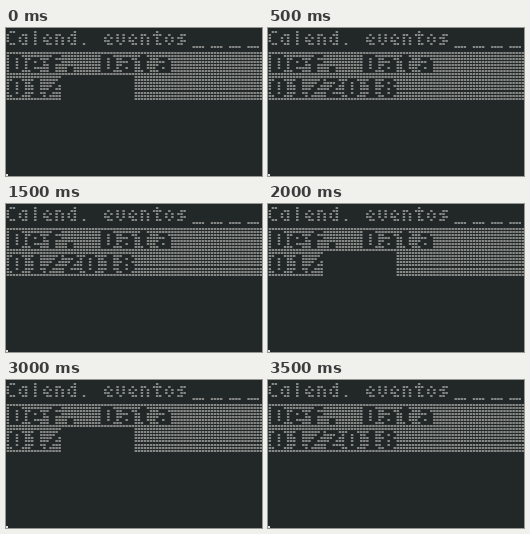
Recreate the animation shown at these times as an HTML page with a canvas. Size 256 by 148 pixels, loop 4 s.

```html
<!DOCTYPE html>
<html lang="pt">
<head>
<meta charset="utf-8">
<style>
html, body { margin: 0; width: 100%; height: 100%; overflow: hidden; background: #222727; }
canvas { display: block; }
</style>
</head>
<body>
<canvas width="256" height="148" aria-label="Calend. eventos: Def. Data 01/2018"></canvas>
<script>
const ctx = document.querySelector('canvas').getContext('2d');
const BACK = '#222727', LIT = '#868886';
const PITCH = 256 / 84, GAP = PITCH / 5;
const CELL = 6, ROW = 8, COLS = 14;

// Glyph rows run top to bottom; # is an inked dot.
const small = {
  C: '.## #.. #.. #.. .##', a: '... .## #.# #.# .##',
  l: '.#. .#. .#. .#. .#.', e: '... .#. #.# ##. .##',
  n: '... ##. #.# #.# #.#', d: '..# .## #.# #.# .##',
  '.': '... ... ... ... .#.', v: '... #.# #.# #.# .#.',
  t: '.#. ### .#. .#. .##', o: '... .#. #.# #.# .#.',
  s: '... .## ##. .## ##.'
};
const large = {
  D: '####. ##.## ##.## ##.## ##.## ####.',
  e: '..... .###. ##.## ##### ##... .###.',
  f: '..### .##.. ##### .##.. .##.. .##..',
  a: '..... .###. ...## .#### ##.## .####',
  t: '.##.. ####. .##.. .##.. .##.. ..##.',
  '.': '..... ..... ..... ..... .##.. .##..',
  0: '.###. ##.## ##.## ##.## ##.## .###.',
  1: '..##. .###. ..##. ..##. ..##. .####',
  2: '####. ...## ..##. .##.. ##... #####',
  8: '.###. ##.## .###. ##.## ##.## .###.',
  '/': '....# ...## ..##. .##.. ##... #....',
  _: '..... ..... ..... ..... ..... ####.'
};

// Each dot keeps a narrow gap on its left and a dark line below.
function dot(x, y) {
  ctx.fillStyle = LIT;
  ctx.fillRect(x * PITCH + GAP, Math.floor(y * PITCH), PITCH - GAP, 2);
}

function eachDot(text, font, advance, draw) {
  [...text].forEach((char, i) => {
    (font[char] || '').split(' ').forEach((line, y) => {
      [...line].forEach((ink, x) => {
        if (ink === '#') draw(i * advance + x, y);
      });
    });
  });
}

function inverseLine(text, row, hiddenFrom = COLS, hiddenTo = COLS) {
  const dark = new Set();
  eachDot(text, large, CELL, (x, y) => dark.add(`${x + 1},${y + 1}`));
  for (let y = 0; y < ROW; y++) {
    for (let x = 0; x < COLS * CELL; x++) {
      const col = Math.floor(x / CELL);
      const hidden = col >= hiddenFrom && col < hiddenTo;
      if (!hidden && !dark.has(`${x},${y}`)) dot(x, row * ROW + y);
    }
  }
}

function draw(time) {
  const yearShown = Math.floor(time / 500) % 2 === 1;
  ctx.fillStyle = BACK;
  ctx.fillRect(0, 0, 256, 148);
  eachDot('Calend. eventos', small, 4, (x, y) => dot(x, y + 1));
  eachDot('____', large, CELL, (x, y) => dot(x + 10 * CELL + 1, y + 1));
  inverseLine('Def. Data', 1);
  if (yearShown) inverseLine('01/2018', 2);
  else inverseLine('01/2018', 2, 3, 7);
  ctx.fillStyle = '#e0e2e0';
  ctx.fillRect(0, 146, 2, 2);
}

const start = performance.now();
function frame() {
  draw((performance.now() - start) % 4000);
  requestAnimationFrame(frame);
}
frame();
</script>
</body>
</html>
```
